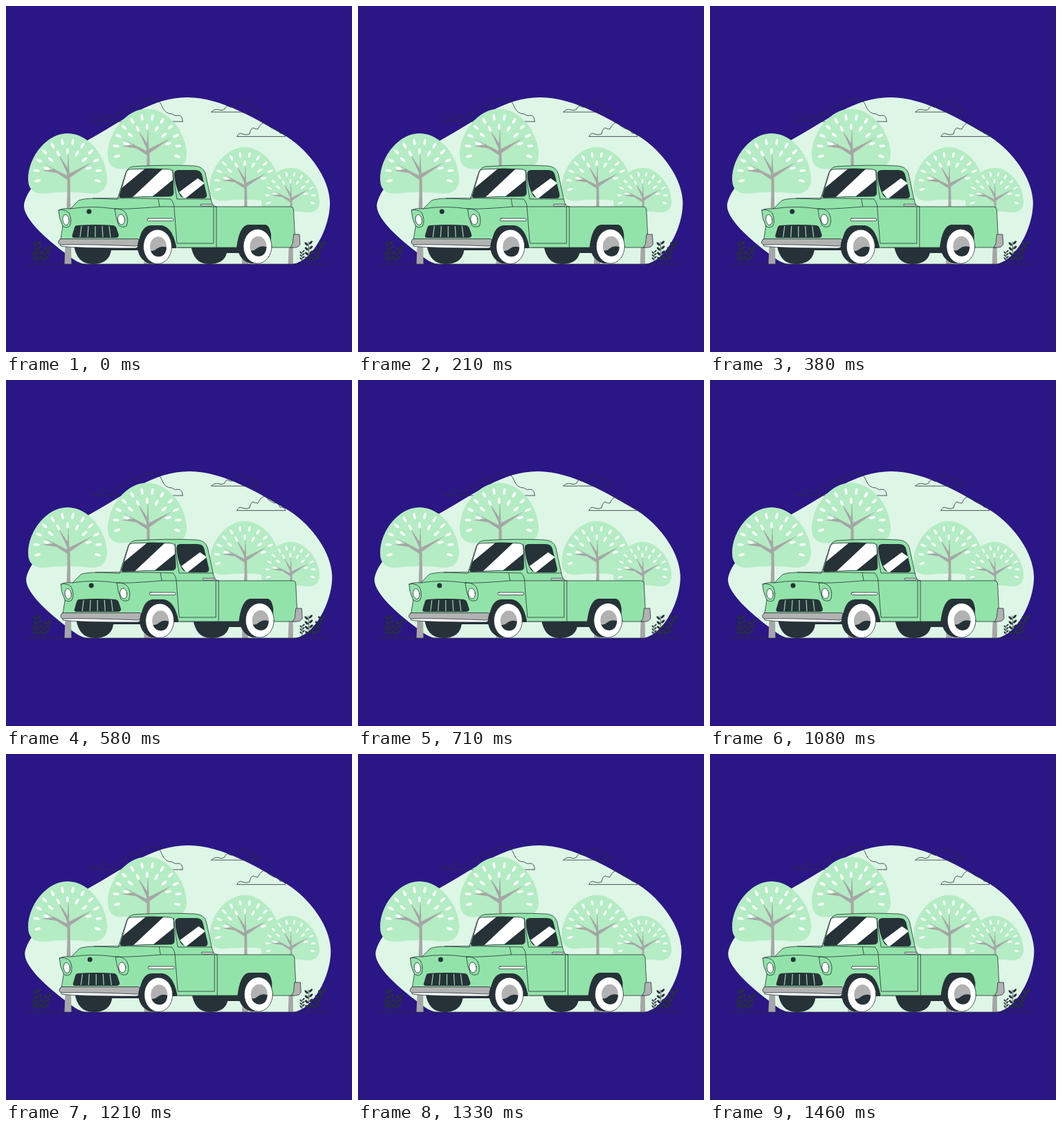
Recreate the animation shown at these times as an HTML page. Size 500 px wide and 500 px high, loop 1.5 s.

```html
<!DOCTYPE html>
<html lang="en">
<head>
<meta charset="utf-8">
<title>Pickup truck</title>
<style>
  html, body { margin: 0; height: 100%; overflow: hidden; background: #2b1685; }
  svg { display: block; width: 100vw; height: 100vh; }
  .green { fill: #92e3a9; }
  .dark { fill: #263238; }
  .grey { fill: #b2b2b2; }
  .white { fill: #fff; }
  .line { fill: none; }
  .line, .edge { stroke: #263238; stroke-width: .8; stroke-linejoin: round; stroke-linecap: round; }
</style>
</head>
<body>
<svg viewBox="0 0 500 500">
  <defs>
    <clipPath id="windshield"><path d="M164 274L174 240Q175 236 180 236Q210 234 236 236Q241 237 241 241L242 270Q242 275 236 275Q200 275 168 277Q163 277 164 274Z"/></clipPath>
    <clipPath id="sideWindow"><path d="M243 243Q243 237 249 237H273Q281 237 283 243L290 272Q291 278 285 278H261Q253 278 250 271Q244 258 243 243Z"/></clipPath>
    <g id="wheel">
      <ellipse class="dark" cx="-7" rx="22" ry="24.800"/>
      <ellipse class="white edge" rx="20.500" ry="24.800"/>
      <ellipse class="grey" cx="1" rx="12" ry="14.500"/>
      <path class="dark" d="M-10 6Q-5 7 -1 3Q5 -2 13 1Q12 14.500 1 14.500Q-7 14 -10 6Z"/>
    </g>
  </defs>

  <path class="shift" fill="#def6e6" d="M262 132C210 132 171 165 118 194C80 215 26 262 26 290C27 309 60 338 84 356C98 367 106 373 118 373H412C442 372 469 320 468 283C467 250 440 211 406 189C366 166 312 132 262 132Z"/>

  <g class="line">
    <path d="M255 167H122Q128 162 134 164Q138 156 146 160Q153 163 157 158Q162 152 168 155Q178 139 191 146Q197 133 209 135Q221 132 226 146Q230 156 240 156Q244 160 250 158Q256 160 255 167Z"/>
    <path d="M297 153.200H368Q366 148 360 148Q356 140 350 143Q345 134 338 139Q333 138 330 144Q326 148 322 145Q318 143 316 149Q312 152 308 150Q301 148 297 153.200Z"/>
    <path d="M334 188.600H404Q402 183 396 184Q393 176 388 178Q383 176 379 173Q375 165 370 170Q366 172 364 178Q360 178 357 176Q353 178 352 185Q347 187 342 185Q336 182 334 188.600Z"/>
  </g>
  <g id="trees"></g>
  <path class="line" d="M31 373H466"/>
  <g id="plants" class="dark"></g>

  <g class="shift">
    <!-- underside and far wheels -->
    <path class="dark" d="M98 345H200V353H152Q149 373 125 373Q102 373 98 345ZM240 342H345V357H319Q315 373 293 373Q271 373 267 345Z"/>
    <!-- body -->
    <path class="green edge" d="M240 290H411Q415 290 415.500 294L418 345Q418 349 413 349H248L240 330Z"/>
    <path class="green edge" d="M161 279L173 241Q175 234 183 232Q230 229 272 231Q285 232 288 242L296 279Q298 290 304 290V349H248L186 345L190 337H79L82 318Q76 306 76 295Q82 292 93 293L105 281Q112 278 130 278Z"/>
    <path class="line" d="M93 293Q124 288 157 293Q175 294 222 290H304M126 278Q170 277 238 279M220 279L222 290M238 279Q243 284 243 292L247 343H300V290M241 237Q243 258 247 279H296"/>
    <!-- headlight hoods -->
    <path class="line" d="M76 295Q85 293 91 299Q96 309 92 318Q87 322 82 318M157 293Q167 292 173 299Q178 309 174 318Q168 321 163 317Q158 305 157 293"/>
    <!-- windows -->
    <g clip-path="url(#windshield)">
      <path class="dark" d="M160 230H245V280H160Z"/>
      <path class="white" d="M160 230H207L160 269ZM229 233H245V248L207 279H180Z"/>
    </g>
    <g clip-path="url(#sideWindow)">
      <path class="dark" d="M240 235H295V280H240Z"/>
      <path class="white" d="M277 249L287 256L258 279L250 269Z"/>
    </g>
    <path class="line" d="M164 274L174 240Q175 236 180 236Q210 234 236 236Q241 237 241 241L242 270Q242 275 236 275Q200 275 168 277Q163 277 164 274Z"/>
    <!-- trim -->
    <rect class="white edge" x="204" y="307" width="38" height="3.600" rx="1.800"/>
    <rect class="white edge" x="281" y="286.500" width="17" height="2.400" rx="1.200"/>
    <circle class="dark" cx="120" cy="297" r="3.500"/>
    <ellipse class="white edge" cx="86.500" cy="309" rx="4.600" ry="7.600" transform="rotate(-8 86.500 309)"/>
    <ellipse class="white edge" cx="166.500" cy="308.500" rx="5" ry="7.600" transform="rotate(-8 166.500 308.500)"/>
    <path class="dark" d="M103 317Q129 315 155 317Q159 318 160 322L163 331Q163 335 158 335H99Q94 335 96 330L99 320Q100 317 103 317Z"/>
    <path d="M109 318L107 334M119 318L118 334M129 318V334M139 318L140 334M149 318L151 334" stroke="#92e3a9" stroke-width="1.200"/>
    <path class="white edge" d="M77 340L79 347Q100 350 187 350Q192 349 192 343Z"/>
    <path class="grey edge" d="M79 336.500H190Q193 337 193 341Q192 347 187 347Q120 344 79 345Q75 344 76 340Q77 337 79 336.500Z"/>
    <path class="grey edge" d="M416 330H424L425 344Q423 349 417 349H411L414 344Z"/>
    <!-- near wheels -->
    <path class="dark" d="M191 350Q193 318 209 317H225Q240 319 246 347V350ZM333 350Q337 317 350 316H375Q381 317 383 330V350Z"/>
    <use href="#wheel" x="219" y="347.800"/>
    <use href="#wheel" x="363.500" y="347.300"/>
  </g>
</svg>
<script>
const GROUND = 373;

function leaf(x, y, angle, rx, ry) {
  return `<ellipse rx="${rx}" ry="${ry}" transform="translate(${x} ${y}) rotate(${angle})"/>`;
}

function leafRing(count, radius, from, to) {
  let out = '';
  for (let i = 0; i < count; i++) {
    const angle = from + (to - from) * i / (count - 1);
    const a = angle * Math.PI / 180;
    out += leaf(radius * Math.cos(a), 57 + radius * Math.sin(a), angle, 4.6, 1.9);
  }
  return out;
}

// Crown is drawn around its top centre; the trunk reaches the ground.
function tree(x, top, scale) {
  const foot = (GROUND - top) / scale;
  return `<g transform="translate(${x} ${top}) scale(${scale})">
    <path fill="#b4ecc4" d="M0 0C30 0 57 34 57 66C57 81 47 88 34 87Q0 83 -34 87C-49 88 -57 81 -57 66C-57 34 -30 0 0 0Z"/>
    <path fill="#a6a6a6" d="M1 22L2.500 58L35 42L3.500 64L5.500 ${foot}H-4.500L-.5 86V67L-16 57L-37 54L-21 52L-36 43L-1 61V57L-14 29L0 50Z"/>
    <g fill="#fff">${leafRing(12, 45, -195, 15)}${leafRing(7, 31, -168, -12)}</g>
  </g>`;
}

function plant(x, height, lean, size) {
  let out = `<path class="line" d="M${x} ${GROUND}Q${x} ${GROUND - height / 2} ${x + lean} ${GROUND - height}"/>`;
  for (let h = 7; h <= height; h += size * 2.2) {
    const cx = x + lean * (h / height) ** 2, y = GROUND - h;
    out += leaf(cx - size, y - 1, 45, size, size * .48) + leaf(cx + size, y - 3, -45, size, size * .48);
  }
  return out;
}

document.getElementById('trees').innerHTML =
  tree(204, 148.5, 1) + tree(89, 184, 1) + tree(345, 204, .89) + tree(411, 234, .737);
document.getElementById('plants').innerHTML =
  plant(48, 31, -4, 3.2) + plant(56, 28, 8, 3.2) + plant(42, 16, -2, 2) +
  plant(438, 32, -1, 3.2) + plant(447, 30, 11, 3.2) + plant(428, 18, 0, 2);

// Shake offsets at every tenth of the loop, linear in between.
const DURATION = 1500, STEPS = 36;
const SHAKE = [0, -1, 2, -2.5, 4, -2.5, 4, -2.5, 2, -1, 0];
const moving = document.querySelectorAll('.shift');

function draw(now) {
  const step = Math.floor((now % DURATION + 4) / DURATION * STEPS) % STEPS + 1;
  const pos = step / STEPS * 10;
  const i = Math.min(9, Math.floor(pos));
  const x = SHAKE[i] + (SHAKE[i + 1] - SHAKE[i]) * (pos - i) + .3;
  moving.forEach(el => el.setAttribute('transform', `translate(${x.toFixed(2)} 0)`));
}

const start = performance.now();
function tick() {
  draw(performance.now() - start);
  requestAnimationFrame(tick);
}
tick();
</script>
</body>
</html>
```
